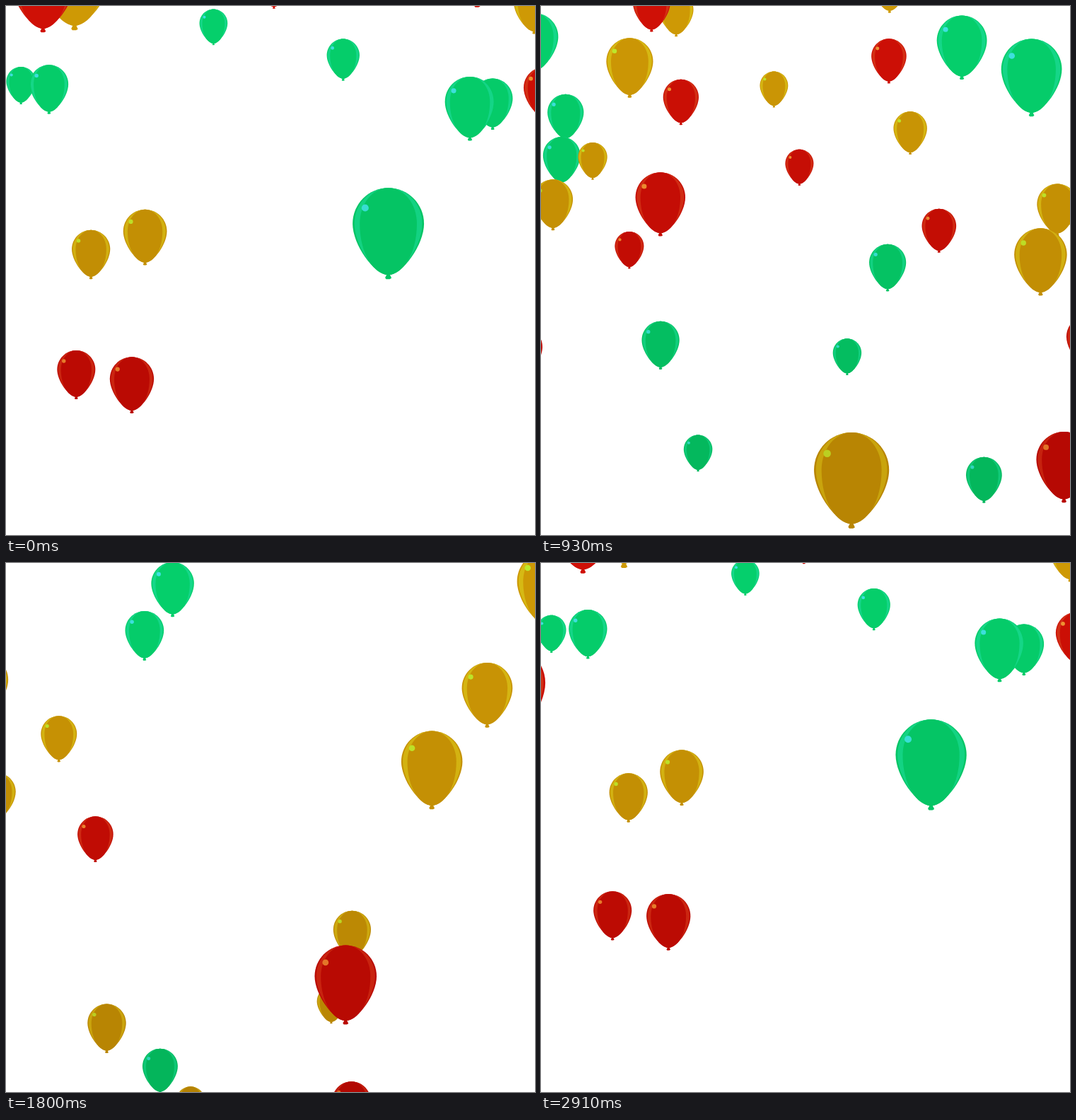
Recreate the animation shown at these times as an HTML page with a canvas. Size 748 by 748 pixels, loop 2.94 s.

```html
<!DOCTYPE html>
<html lang="en">
<head>
<meta charset="utf-8">
<title>Balloons</title>
<style>
html, body { margin: 0; width: 100%; height: 100%; overflow: hidden; background: #fff; }
canvas { display: block; width: 748px; height: 748px; }
</style>
</head>
<body>
<canvas id="stage" width="748" height="748"></canvas>
<script>
const LOOP = 2.94, STEP = 0.03, SIZE = 748; // seconds, pixels
const HEIGHT = 1.28; // balloon height for a width of 1
const ctx = document.getElementById('stage').getContext('2d');

// Every colour repeats the same flights, each with its own delay.
const layers = [
  { delay: 0,    top: [5, 208, 108], low: [4, 180, 90],  rim: [24, 216, 142], spot: [64, 224, 226] },
  { delay: 0.69, top: [206, 153, 5], low: [181, 130, 3], rim: [216, 190, 22], spot: [188, 234, 44] },
  { delay: 0.45, top: [207, 16, 6],  low: [178, 8, 2],   rim: [212, 54, 24],  spot: [240, 152, 52] }
];

// A balloon enters over the top edge at x and then falls freely;
// pull is its downward curve and turn its sideways curve.
const flights = [];
const fly = (enter, x, w, vx, vy, pull, turn = 0) =>
  flights.push({ enter, x, w, vx, vy, pull, turn });

fly(-0.5, 367, 44, 240, 55, 301, -41);
fly(-0.454, 667, 91, -184, 419, 890, -208);
fly(-0.435, 612, 55, 175, 254, 330);
fly(-0.413, -68, 42, 216, 270, 165);
fly(-0.36, 548, 65, 354, 279, 639, -150);
fly(-0.334, 122, 52, -183, 316, 396);
fly(-0.196, 264, 39.5, 150, 243, 195);
fly(-0.04, 48, 61, 328, 251, 676, -184);
fly(0.13, 183, 48, 89, 346, 360, -133);
fly(0.21, 493, 48, -4, 306, 343);
fly(0.377, 190, 53, -335, 333, 225, 80);
fly(0.41, -87, 52, 243, 264, 200, -17);
fly(0.745, 502, 70, 518, 480, 416, -80);
fly(0.756, 782, 85, -508, 809, 478);
fly(0.76, 15, 66, -150, 501, 333, 60);
fly(0.985, 712, 86, 430, 690, 430);
fly(1.42, 297, 55, -311, 278, 227, 118);
fly(1.627, 252, 60, -97, 380, 329, 13);
fly(2.155, 753, 58, -100, 389, 270, 370);
fly(2.212, 123, 105, -685, 874, 557);
fly(2.44, 64, 88, -233, 720, 450);

const mod = (a, n) => ((a % n) + n) % n;
const mix = (a, b, k) => a.map((v, i) => v + (b[i] - v) * k);
const rgb = c => `rgb(${c.map(Math.round)})`;

// Balloons that come nearer fall faster, so growth follows from the pull.
function poseAt(f, s) {
  const grow = (f.pull / f.w - 4.5) / 22;
  return {
    x: f.x + f.vx * s + f.turn * s * s,
    y: -HEIGHT * f.w + f.vy * s + f.pull * s * s,
    w: f.w * (1 + grow * s)
  };
}

// Body of width sx with its top at 0; a larger belly keeps it wide for longer.
function body(sx, belly, color) {
  const h = 0.5 * sx, c = 0.276 * sx;
  ctx.fillStyle = color;
  ctx.beginPath();
  ctx.moveTo(0, 0);
  ctx.bezierCurveTo(c, 0, h, 0.224, h, 0.5);
  ctx.bezierCurveTo(h, belly, 0.2, 1.21, 0, 1.22);
  ctx.bezierCurveTo(-0.2, 1.21, -h, belly, -h, 0.5);
  ctx.bezierCurveTo(-h, 0.224, -c, 0, 0, 0);
  ctx.fill();
}

function knot() {
  ctx.beginPath();
  ctx.moveTo(-0.015, 1.2);
  ctx.lineTo(0.015, 1.2);
  ctx.lineTo(0.045, 1.265);
  ctx.lineTo(0.02, HEIGHT);
  ctx.lineTo(-0.03, HEIGHT);
  ctx.lineTo(-0.045, 1.26);
  ctx.fill();
}

function balloon({ x, y, w }, layer) {
  const depth = Math.min(1, Math.max(0, (y + w * 0.6) / SIZE));
  const base = mix(layer.top, layer.low, depth);
  const plain = rgb(base);
  ctx.save();
  ctx.translate(x, y);
  ctx.scale(w, w);
  body(1, 0.8, plain);
  body(0.95, 0.8, rgb(mix(layer.rim, base, 0.12 + depth * 0.38)));
  body(0.8, 0.93, plain);
  knot();
  ctx.fillStyle = rgb(mix(layer.spot, base, depth * 0.3));
  ctx.beginPath();
  ctx.arc(-0.325, 0.28, 0.05, 0, Math.PI * 2);
  ctx.fill();
  ctx.restore();
}

function draw(time) {
  ctx.fillStyle = '#fff';
  ctx.fillRect(0, 0, SIZE, SIZE);
  for (const layer of layers) {
    flights
      .map(f => poseAt(f, mod(time - layer.delay - f.enter, LOOP)))
      .filter(p => p.y < SIZE)
      .sort((a, b) => a.w - b.w)
      .forEach(p => balloon(p, layer));
  }
}

const start = performance.now();
function tick() {
  const t = mod((performance.now() - start) / 1000, LOOP);
  draw(Math.floor(t / STEP + 0.01) * STEP);
  requestAnimationFrame(tick);
}
tick();
</script>
</body>
</html>
```
